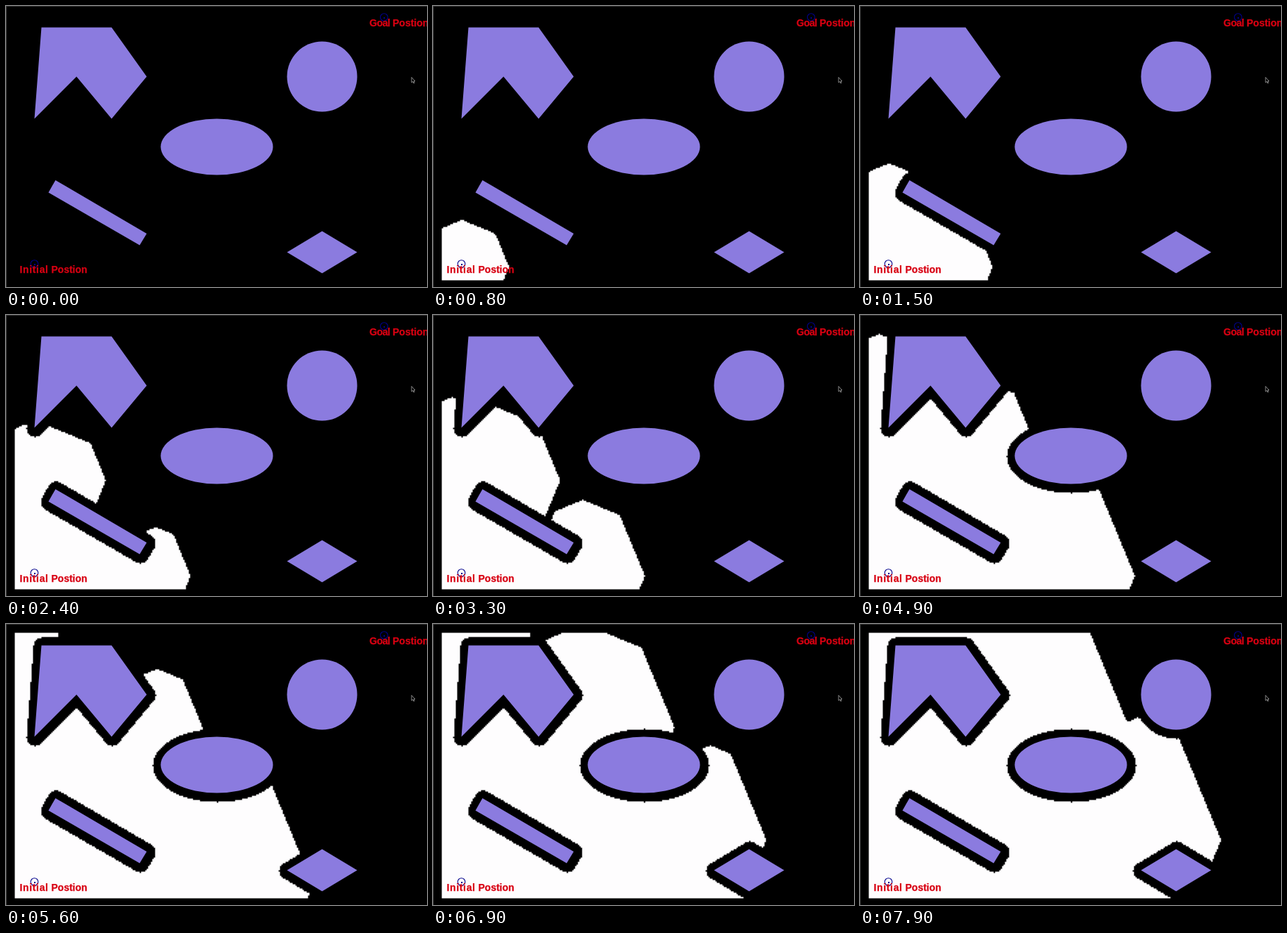
An HTML page with a canvas for the animation above (8000 ms loop, 600 by 400 pixels).

```html
<!DOCTYPE html>
<html lang="en">
<head>
<meta charset="utf-8">
<title>Wavefront search</title>
<style>
  html, body { margin: 0; width: 100%; height: 100%; overflow: hidden; background: #000; }
  canvas, svg { position: absolute; left: 0; top: 0; width: 600px; height: 400px; }
  text { font: bold 14px "Liberation Sans", Arial, sans-serif; fill: #d80012; stroke: #d80012; stroke-width: .25; }
</style>
</head>
<body>
<canvas id="field" width="600" height="400"></canvas>
<svg viewBox="0 0 600 400">
  <path d="M0 .5H600" stroke="#2c2c2c"/>
  <path d="M.5 0V400" stroke="#3a3a3a"/>
  <g id="shapes" transform="translate(.5 .5) scale(2)" fill="#8b7bdf"></g>
  <g fill="none" stroke="#00008c" stroke-width="1.1">
    <circle cx="40.5" cy="367" r="5.3"/>
    <circle cx="538.8" cy="16" r="5.3"/>
  </g>
  <g fill="#00008c">
    <rect x="40" y="367" width="2" height="2"/>
    <rect x="538" y="16" width="2" height="2"/>
  </g>
  <text y="380"><tspan x="19.5" letter-spacing=".65">Initial</tspan><tspan x="64.5">Postion</tspan></text>
  <text y="28.5"><tspan x="518" letter-spacing="-.5">Goal</tspan><tspan x="551">Postion</tspan></text>
  <path d="M578 101.5V109L579.8 107.5L581 110L582 109.5L581 107H583Z" fill="#000" stroke="#aaa" stroke-width=".8"/>
</svg>
<script>
// Grid units are 2 px; y points down.
const W = 300, H = 200, MARGIN = 6, CLEARANCE = 6, LOOP = 8000, STEP = 100;
const START = { x: 20, y: 185 };

const polygons = [
  [[25, 15], [75, 15], [100, 50], [75, 80], [50, 50], [20, 80]],
  [[30, 132.5], [35, 123.7], [100, 161.7], [95, 170]],
  [[225, 160], [250, 175], [225, 190], [200, 175]],
];
const ellipses = [
  { cx: 150, cy: 100, rx: 40, ry: 20 },
  { cx: 225, cy: 50, rx: 25, ry: 25 },
];

// Time in ms and the path length, in px, that the search has reached.
const progress = [[340, 0], [1500, 147.5], [3300, 260.5], [4200, 303.5],
                  [5600, 396], [6900, 460], [7900, 499.5]];

function addShape(tag, attrs) {
  const el = document.createElementNS("http://www.w3.org/2000/svg", tag);
  for (const key in attrs) el.setAttribute(key, attrs[key]);
  document.getElementById("shapes").append(el);
}
polygons.forEach(p => addShape("polygon", { points: p.join(" ") }));
ellipses.forEach(e => addShape("ellipse", e));

function segmentDistance(x, y, [ax, ay], [bx, by]) {
  const dx = bx - ax, dy = by - ay;
  const k = ((x - ax) * dx + (y - ay) * dy) / (dx * dx + dy * dy);
  const t = Math.max(0, Math.min(1, k));
  return Math.hypot(x - ax - t * dx, y - ay - t * dy);
}

function nearPolygon(points, x, y) {
  let inside = false;
  for (let i = 0; i < points.length; i++) {
    const a = points[i], b = points[(i + 1) % points.length];
    if (segmentDistance(x, y, a, b) <= CLEARANCE + 1e-9) return true;
    if ((a[1] > y) !== (b[1] > y) &&
        x < a[0] + (y - a[1]) * (b[0] - a[0]) / (b[1] - a[1])) inside = !inside;
  }
  return inside;
}

function nearEllipse({ cx, cy, rx, ry }, x, y) {
  return Math.hypot((x - cx) / (rx + CLEARANCE), (y - cy) / (ry + CLEARANCE)) <= 1 + 1e-9;
}

function isFree(x, y) {
  return x >= MARGIN && x <= W - MARGIN && y >= MARGIN && y <= H - MARGIN &&
    !polygons.some(p => nearPolygon(p, x, y)) && !ellipses.some(e => nearEllipse(e, x, y));
}

// Eight-way Dijkstra; no move is shorter than a bucket's width of 1.
function search() {
  const free = Array.from({ length: W * H }, (_, i) => isFree(i % W, Math.floor(i / W)));
  const dist = new Float64Array(W * H).fill(Infinity);
  const first = START.y * W + START.x;
  const buckets = [[first]];
  dist[first] = 0;
  for (let b = 0; b < buckets.length; b++) {
    for (const cell of buckets[b] || []) {
      if (Math.floor(dist[cell]) !== b) continue;
      for (let dy = -1; dy <= 1; dy++) for (let dx = -1; dx <= 1; dx++) {
        const next = cell + dy * W + dx;
        const d = dist[cell] + Math.hypot(dx, dy);
        if (!free[next] || d >= dist[next] - 1e-9) continue;
        dist[next] = d;
        (buckets[Math.floor(d)] ||= []).push(next);
      }
    }
  }
  return dist;
}

const dist = search();
const order = [...dist.keys()].filter(i => dist[i] < Infinity).sort((a, b) => dist[a] - dist[b]);
const counts = progress.map(([time, reach]) =>
  [time, reach && order.filter(i => dist[i] * 2 <= reach).length]);

// Cells are visited at a steady rate between the known points.
function visitedAt(time) {
  if (time <= counts[0][0]) return 0;
  const k = Math.max(1, counts.findIndex(c => c[0] >= time));
  const [t0, n0] = counts[k - 1], [t1, n1] = counts[k];
  return Math.round(n0 + (n1 - n0) * (time - t0) / (t1 - t0));
}

const ctx = document.getElementById("field").getContext("2d");
const buffer = document.createElement("canvas");
buffer.width = W * 2;
buffer.height = H * 2;
const cells = buffer.getContext("2d");
cells.fillStyle = "#fefdfe";
let shown = -1;

function render(time) {
  const tick = Math.floor((time % LOOP) / STEP) * STEP;
  if (tick === shown) return;
  shown = tick;
  cells.clearRect(0, 0, W * 2, H * 2);
  for (const i of order.slice(0, visitedAt(tick))) {
    cells.fillRect(i % W * 2, Math.floor(i / W) * 2, 2, 2);
  }
  // Half a pixel of offset lines the cells up with the shapes.
  ctx.clearRect(0, 0, W * 2, H * 2);
  ctx.drawImage(buffer, .5, .5);
}

const begin = performance.now();
function loop() {
  render(performance.now() - begin);
  requestAnimationFrame(loop);
}
loop();
</script>
</body>
</html>
```
